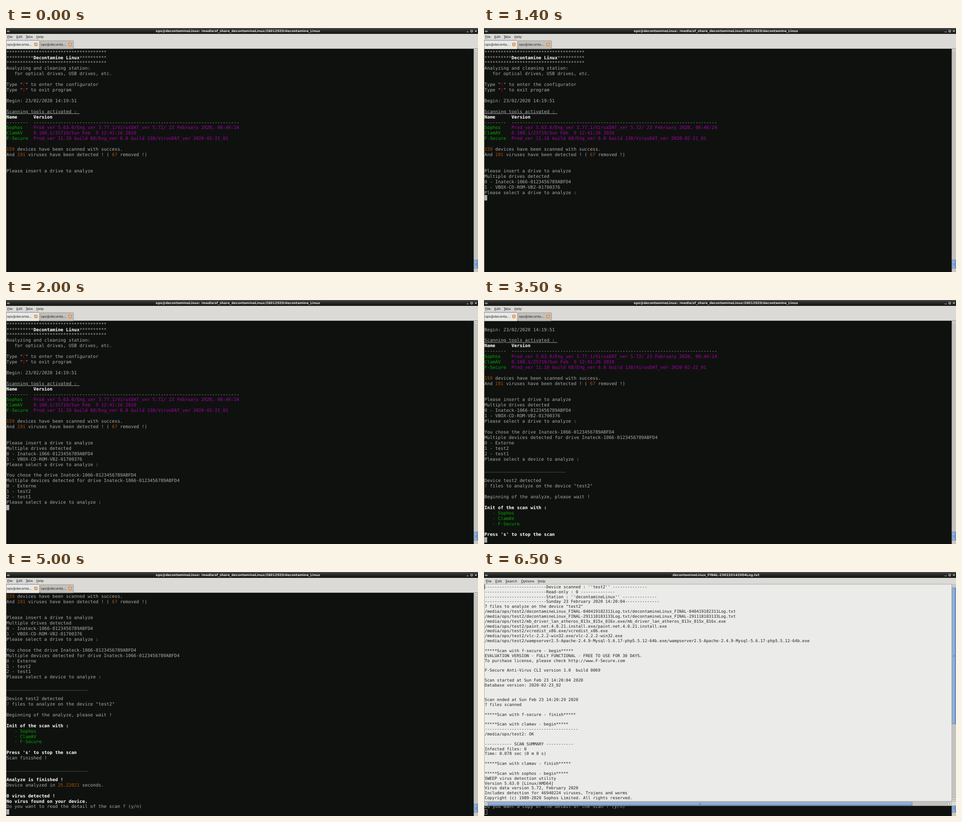
These frames come from a looping animation (1039 by 539 pixels, 8000 ms). An HTML page:

```html
<!DOCTYPE html>
<html lang="en">
<head>
<meta charset="utf-8">
<title>Decontamine Linux</title>
<style>
  html, body { margin: 0; width: 100%; height: 100%; overflow: hidden; background: #0f110f; }
  svg { display: block; width: 1039px; height: 539px; }
  text { white-space: pre; text-rendering: geometricPrecision; font: 7.1px "DejaVu Sans", sans-serif; fill: #1c1c1c; }
  .title { font-weight: bold; fill: #e4e4e2; text-anchor: middle; }
  .term text { font: 9.908px "DejaVu Sans Mono", monospace; fill: #aaa; }
  .log text { font: 9.003px "DejaVu Sans Mono", monospace; fill: #222; }
  .big text { font-size: 7.6px; }
  .w { fill: #fff; font-weight: bold; }
  .g { fill: #0a0; }
  .p { fill: #a0a; }
  .o { fill: #a50; }
  .r { fill: #a00; }
  .u { text-decoration: underline; }
</style>
</head>
<body>
<svg viewBox="0 0 1039 539">
  <defs>
    <linearGradient id="bar" x2="0" y2="1">
      <stop stop-color="#5a5b57"/><stop offset=".15" stop-color="#3a3b38"/>
      <stop offset=".5" stop-color="#252623"/><stop offset="1" stop-color="#161714"/>
    </linearGradient>
    <linearGradient id="thumbV"><stop stop-color="#a3bfe4"/><stop offset="1" stop-color="#7598cb"/></linearGradient>
    <linearGradient id="thumbH" x2="0" y2="1"><stop stop-color="#a3bfe4"/><stop offset="1" stop-color="#7598cb"/></linearGradient>
  </defs>
  <rect width="1039" height="539" fill="#0f110f"/>
  <g id="term" class="term"></g>
  <g id="frame"></g>
  <g id="editor"></g>
  <g id="titlebar"></g>
</svg>
<script>
const $ = id => document.getElementById(id);
const rect = (x, y, w, h, fill, extra = '') =>
  `<rect x="${x}" y="${y}" width="${w}" height="${h}" fill="${fill}" ${extra}/>`;
const path = (d, stroke, width = 1) => `<path d="${d}" fill="none" stroke="${stroke}" stroke-width="${width}"/>`;
const label = (x, y, s, cls = '') => `<text x="${x}" y="${y}" class="${cls}">${s}</text>`;
const styled = s => s.replace(/(\w)\{(.*?)\}/g, '<tspan class="$1">$2</tspan>');

const stars = '*'.repeat(37), ten = '*'.repeat(10), rule = '_'.repeat(30);
const terminal = `${stars}
${ten}w{Decontamine Linux}${ten}
${stars}
Analyzing and cleaning station:
   for optical drives, USB drives, etc.

Type "r{C}" to enter the configurator
Type "r{E}" to exit program

Begin: 23/02/2020 14:19:51

u{Scanning tools activated : }
w{Name      Version}
${'-'.repeat(8)}  ${'-'.repeat(76)}
g{Sophos}    p{Prod_ver 5.63.0/Eng_ver 3.77.1/VirusDAT_ver 5.72/ 23 February 2020, 06:46:24}
g{ClamAV}    p{0.100.1/25719/Sun Feb  9 12:41:26 2020}
g{F-Secure}  p{Prod_ver 11.10 build 68/Eng_ver 6.0 build 138/VirusDAT_ver 2020-02-21_01}

o{159} devices have been scanned with success.
And o{191} viruses have been detected ! ( o{67} removed !)


Please insert a drive to analyze
Multiple drives detected
0 - Inateck-1066-0123456789ABFD4
1 - VBOX-CD-ROM-VB2-01700376
Please select a drive to analyze :

You chose the drive Inateck-1066-0123456789ABFD4
Multiple devices detected for drive Inateck-1066-0123456789ABFD4
0 - Externe
1 - test2
2 - test1
Please select a device to analyze :

${rule}

Device test2 detected
o{7} files to analyze on the device "test2"

Beginning of the analyze, please wait !

w{Init of the scan with :}
   g{- Sophos}
   g{- ClamAV}
   g{- F-Secure}

w{Press 's' to stop the scan}
Scan finished !

${rule}

w{Analyze is finished !}
Device analyzed in o{25.22021} seconds.

w{0 virus detected !}
w{No virus found on your device.}
Do you want to read the detail of the scan ? (y/n)
Do you want a copy of the detail of the scan ? (y/n)`.split('\n');

const dashes = '-'.repeat(25), tail = '-'.repeat(14), home = '/media/ops/test2';
const installed = name => `${home}/${name}/${name}`;
const log = `${dashes}Device scanned : ''test2'' ${tail}
${dashes}Read-only : 0 ${tail}
${dashes}Station : ''decontamineLinux'' ${tail}
${dashes}Sunday 23 February 2020 14:20:04${tail}
7 files to analyze on the device "test2"
${installed('decontamineLinux_FINAL-040419182311Log.txt')}
${installed('decontamineLinux_FINAL-291118183133Log.txt')}
${installed('mb_driver_lan_atheros_813x_815x_816x.exe')}
${installed('paint.net.4.0.21.install.exe')}
${installed('vcredist_x86.exe')}
${installed('vlc-2.2.2-win32.exe').replace(/\.exe\//, '.exe/').replace(/\.exe$/, '.exe')}
${installed('wampserver2.5-Apache-2.4.9-Mysql-5.6.17-php5.5.12-64b.exe')}

*****Scan with f-secure - begin*****
EVALUATION VERSION - FULLY FUNCTIONAL - FREE TO USE FOR 30 DAYS.
To purchase license, please check http://www.F-Secure.com

F-Secure Anti-Virus CLI version 1.0  build 0069

Scan started at Sun Feb 23 14:20:04 2020
Database version: 2020-02-23_02


Scan ended at Sun Feb 23 14:20:29 2020
7 files scanned

*****Scan with f-secure - finish*****

*****Scan with clamav - begin*****
${'-'.repeat(38)}
${home}: OK

----------- SCAN SUMMARY -----------
Infected files: 0
Time: 0.078 sec (0 m 0 s)

*****Scan with clamav - finish*****

*****Scan with sophos - begin*****
SWEEP virus detection utility
Version 5.63.0 [Linux/AMD64]
Virus data version 5.72, February 2020
Includes detection for 46940224 viruses, Trojans and worms
Copyright (c) 1989-2020 Sophos Limited. All rights reserved.`.split('\n');

const arrow = (x, y, turn) =>
  `<path d="M-2 1L0 -1L2 1" transform="translate(${x} ${y}) rotate(${turn})" fill="none" stroke="#444"/>`;
const button = (x, y, turn) =>
  rect(x + .5, y + .5, 8, 7.5, '#e2e0dc', 'stroke="#9c9a95" stroke-width=".7"') + arrow(x + 4.5, y + 4.3, turn);
const thumbEdge = 'stroke="#51709f" stroke-width=".7"';

function vScroll(top, bottom, from, to) {
  const mid = (from + to) / 2;
  return rect(1029.5, top, 9.5, bottom - top, '#c4c2bd') + button(1030, top, 0) + button(1030, bottom - 8.5, 180) +
    rect(1030.5, from, 8, to - from, 'url(#thumbV)', thumbEdge) +
    path([-1.5, 0, 1.5].map(d => `M1032.5 ${mid + d}h4`).join(''), '#51709f', .6);
}

function tab(x, y, fill, line) {
  return path(`M${x + .5} 46V${y + 1}q0 -1 1 -1h71q1 0 1 1V46`, '#97958f') +
    rect(x + 1, y + .5, 72, 46 - y, fill) + rect(x + 1, y, 72, 1, line) +
    label(x + 2, 38.8, 'ops@deconta...') +
    rect(x + 62.5, 33, 6.5, 6.5, '#ee9a45', 'rx="1" stroke="#cf7524" stroke-width=".6"') +
    path(`M${x + 64.2} 34.7l3 3m0 -3l-3 3`, '#fff');
}

const menu = (y, items) => items.map(([x, s]) =>
  label(x, y, s) + rect(x + .4, y + 1, 3.6, .6, '#1c1c1c')).join('');

$('frame').innerHTML =
  rect(0, 13, 1039, 33, '#dcdad6') +
  menu(21.7, [[2.7, 'File'], [22.8, 'Edit'], [43.2, 'Tabs'], [66.8, 'Help']]) +
  rect(0, 45, 1039, 1, '#aaa8a3') +
  tab(75, 28, '#c3c0bb', '#b3b0aa') + rect(75, 45, 74, 1, '#aaa8a3') +
  tab(0, 27, '#e9e8e5', '#7c9cc9') +
  rect(0, 46, .8, 493, '#b5b3ae') +
  vScroll(46, 539, 512.5, 531);

$('editor').innerHTML =
  rect(0, 13, 1039, 504, '#dcdad6') +
  '<g class="big">' + menu(22.8, [[4, 'File'], [24.7, 'Edit'], [47, 'Search'], [81.5, 'Options'], [118, 'Help']]) + '</g>' +
  rect(.5, 27, 1029, 479.5, '#ebebe9', 'stroke="#9c9a95" stroke-width=".8"') +
  '<g class="log">' + log.map((s, i) => label(1.5, 35.9 + i * 10.84, s)).join('') + '</g>' +
  rect(1.3, 27.5, .8, 10.5, '#111') +
  vScroll(27, 507, 35, 335.5) +
  rect(0, 507.5, 1029.5, 9, '#c4c2bd') + button(0, 508, -90) + button(1020, 508, 90) +
  rect(8.5, 508.5, 934, 7.5, 'url(#thumbH)', thumbEdge) +
  path('M473.5 510.3v4m1.5 -4v4m1.5 -4v4', '#51709f', .6) +
  rect(0, 516.2, 1039, .8, '#6b6a66');

$('titlebar').innerHTML =
  rect(0, 0, 1039, 13, 'url(#bar)') +
  '<text id="title" class="title" x="510.5" y="9.3"></text>' +
  rect(2, 6, 6, 3, '#8b8d88') + rect(4.5, 4, 1, 6, '#777974') +
  path('M1014 8.6h4', '#d5d5d2', 1.1) +
  path('M1023.2 5h3.6v3.6h-3.6z', '#d5d5d2', 1.1) +
  path('M1032.5 5.2l3.4 3.4m0 -3.4l-3.4 3.4', '#d5d5d2', 1.1);

const ROW = 11.92, TOP = 47.2;
// start time, rows scrolled off, rows printed, cursor shown, log open
const stages = [
  [0, 0, 23, false, false],
  [500, 0, 27, true, false],
  [2000, 0, 34, true, false],
  [3500, 8, 48, true, false],
  [5000, 18, 58, true, false],
  [6500, 19, 59, true, true]
];

function show([, scroll, end, cursor, open]) {
  const y = TOP + (end - scroll) * ROW;
  $('term').innerHTML = terminal.slice(scroll, end)
    .map((s, i) => label(1, TOP + 9.4 + i * ROW, styled(s))).join('') +
    (!cursor ? '' : open ? rect(1.4, y + .4, 5.4, 11.2, 'none', 'stroke="#aaa" stroke-width=".8"')
                         : rect(1, y, 6, ROW, '#aaa'));
  $('editor').style.display = open ? '' : 'none';
  $('title').textContent = open ? 'decontamineLinux_FINAL-230220142004Log.txt'
    : 'ops@decontamineLinux: /media/sf_share_decontamineLinux/26012020/decontamine_Linux';
}

let current;
const begin = performance.now();
function tick(now) {
  const t = Math.max(0, now - begin) % 8000;
  const stage = stages.findLast(s => s[0] <= t);
  if (stage !== current) show(current = stage);
  requestAnimationFrame(tick);
}
tick(begin);
</script>
</body>
</html>
```
